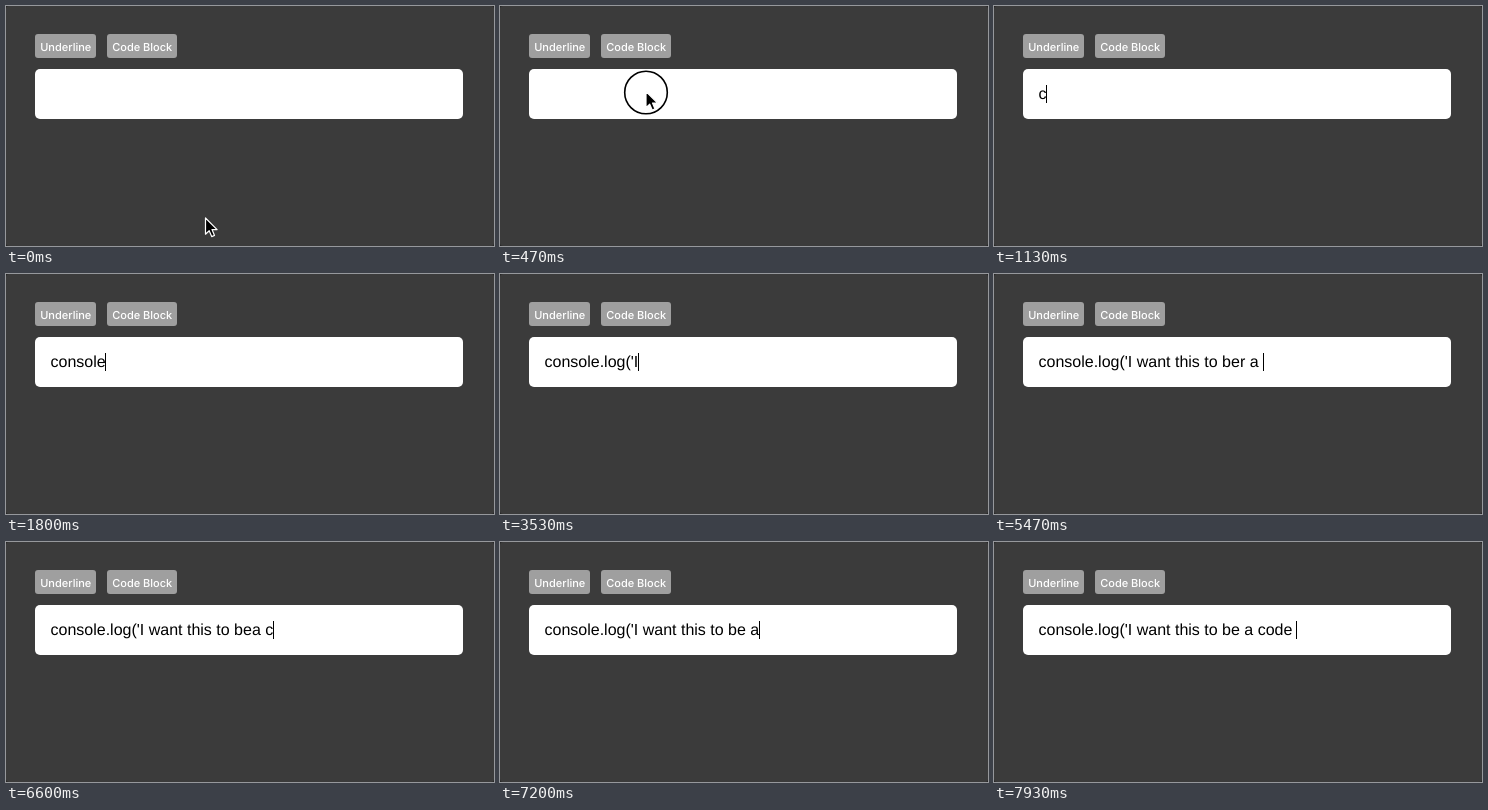
Animation of 488 by 240 pixels, one loop 8000 ms. Source, as an HTML page:

```html
<!DOCTYPE html>
<html lang="en">
<head>
<meta charset="utf-8">
<title>Typing in an editor</title>
<style>
  html, body { margin: 0; width: 100%; height: 100%; overflow: hidden; background: #242424; }
  svg { display: block; width: 488px; height: 240px; }
  text { text-rendering: geometricPrecision; white-space: pre; }
  .label { font: 500 11px Inter, sans-serif; fill: #fff; }
  .typed { font: 16px "Liberation Sans", Arial, sans-serif; fill: #000; }
</style>
</head>
<body>
<svg viewBox="0 0 488 240" xmlns="http://www.w3.org/2000/svg">
  <rect width="488" height="240" rx="3" fill="#3b3b3b"/>
  <g fill="#9f9f9f">
    <rect x="29" y="28" width="61" height="24" rx="3"/>
    <rect x="101" y="28" width="70" height="24" rx="3"/>
  </g>
  <text class="label" x="34.2" y="45">Underline</text>
  <text class="label" x="106.2" y="45">Code Block</text>
  <rect x="29" y="63" width="428" height="50" rx="5" fill="#fff"/>
  <text id="typed" class="typed" x="44.5" y="93" xml:space="preserve"></text>
  <rect id="caret" y="79" width="1" height="18"/>
  <circle id="ring" cx="146" cy="86.5" r="21.3" fill="none" stroke="#000" stroke-width="1.6"/>
  <path id="arrow" d="M0 0V16.2L3.7 12.7L6.2 18.6L9 17.4L6.5 11.6H11.6Z"
    fill="#000" stroke="#fff" stroke-width="1.2" stroke-linejoin="round"/>
  <path id="beam" d="M143.5 79Q146 79 146 81Q146 79 148.5 79M146 81V94M143.5 96Q146 96 146 94Q146 96 148.5 96M144.5 89H147.5"
    fill="none" stroke="#000"/>
</svg>
<script>
const LOOP = 8000, START_X = 44.5;
const $ = id => document.getElementById(id);
const typed = $('typed'), caret = $('caret'), ring = $('ring');
const arrow = $('arrow'), beam = $('beam');

// Keystrokes by time; '<' is backspace.
const keys = [
  [1130, 'c'], [1270, 'on'], [1470, 's'], [1600, 'o'], [1730, 'l'], [1800, 'e'], [1930, '.'],
  [2070, 'l'], [2130, 'o'], [2200, 'g'], [2470, '('], [2730, "'"],
  [3530, 'I'], [3600, ' '], [3730, 'w'], [3870, 'a'], [4000, 'nt'], [4130, ' '],
  [4400, 't'], [4470, 'h'], [4530, 'i'], [4600, 's'], [4670, ' '],
  [4870, 't'], [4930, 'o'], [5000, ' '], [5130, 'b'], [5200, 'er'], [5330, ' '], [5400, 'a'], [5470, ' '],
  [5730, '<'], [5870, '<'], [5930, '<'], [6000, '<'], [6130, 'a'], [6270, ' '], [6600, 'c'],
  [6870, '<'], [6930, '<'], [7070, '<'], [7130, ' '], [7200, 'a'], [7330, ' '],
  [7530, 'c'], [7670, 'o'], [7870, 'de'], [7930, ' ']
];
// Pointer travel: time, share of the way.
const moves = [[70, 0.2], [130, 0.55], [200, 0.88], [330, 1]];

const within = (t, a, b) => t >= a && t < b;
const show = (el, on) => el.setAttribute('visibility', on ? 'visible' : 'hidden');

function textAt(t) {
  let s = '';
  for (const [time, key] of keys) {
    if (time > t) break;
    s = key === '<' ? s.slice(0, -1) : s + key;
  }
  return s;
}

function draw(t) {
  const s = textAt(t);
  if (typed.textContent !== s) typed.textContent = s;
  const width = s ? typed.getComputedTextLength() : 0;
  caret.setAttribute('x', Math.round(START_X + width - 0.4));
  show(caret, t >= 530 && !within(t, 3270, 3530));

  let p = 0;
  for (const [time, share] of moves) if (t >= time) p = share;
  arrow.setAttribute('transform', `translate(${199.5 - 53.5 * p} ${212 - 126.5 * p})`);
  show(arrow, t < 670);
  show(beam, within(t, 670, 1070));
  show(ring, within(t, 470, 670));
  ring.setAttribute('opacity', t < 600 ? 1 : 0.4);
}

const begin = performance.now();
function tick() {
  draw((performance.now() - begin) % LOOP);
  requestAnimationFrame(tick);
}
tick();
</script>
</body>
</html>
```
